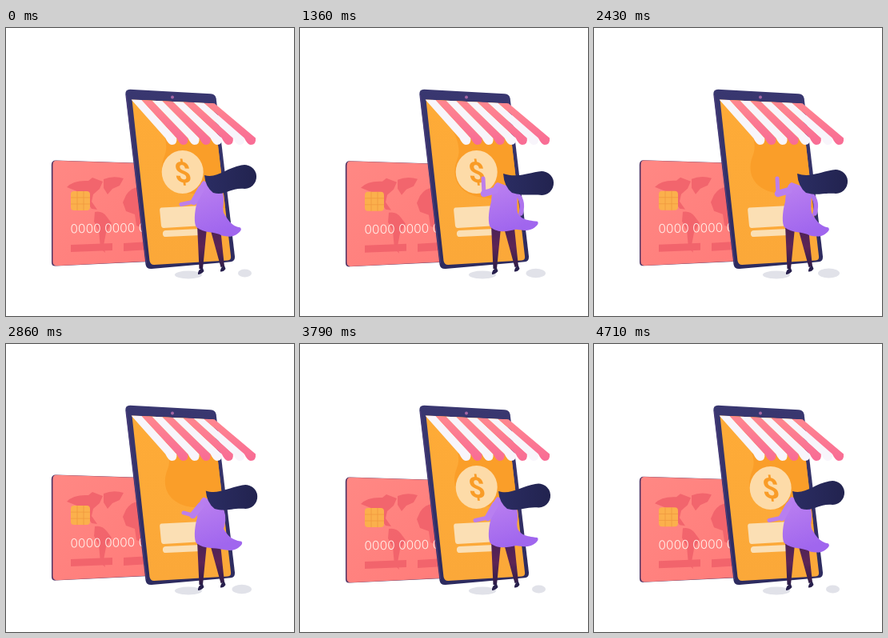
These frames come from a looping animation (360 px wide and 360 px high, 4780 ms). An HTML page:

```html
<!DOCTYPE html>
<html lang="en">
<head>
<meta charset="utf-8">
<title>Mobile shop</title>
<style>
html, body { margin: 0; width: 100%; height: 100%; overflow: hidden; background: #fff; }
svg { display: block; width: 100vw; height: 100vh; }
</style>
</head>
<body>
<svg viewBox="0 0 360 360">
  <defs>
    <linearGradient id="cardFill" x1="0" y1="0" x2="1" y2="1">
      <stop offset="0" stop-color="#ff8884"/><stop offset="1" stop-color="#ff7b79"/>
    </linearGradient>
    <linearGradient id="frameFill" x1="0" y1="0" x2="0" y2="1">
      <stop offset="0" stop-color="#393770"/><stop offset="1" stop-color="#2d2b5f"/>
    </linearGradient>
    <linearGradient id="screenFill" x1="0" y1="0" x2="0" y2="1">
      <stop offset="0" stop-color="#feab37"/><stop offset="1" stop-color="#fba839"/>
    </linearGradient>
    <linearGradient id="coatFill" x1="0" y1="0" x2=".3" y2="1">
      <stop offset="0" stop-color="#bd82f0"/><stop offset="1" stop-color="#a066ee"/>
    </linearGradient>
    <linearGradient id="legFill" x1="0" y1="0" x2="0" y2="1">
      <stop offset="0" stop-color="#4a2157"/><stop offset=".5" stop-color="#5d2555"/><stop offset="1" stop-color="#2c1d48"/>
    </linearGradient>
    <linearGradient id="hairFill" x1="0" y1="0" x2="1" y2="0">
      <stop offset="0" stop-color="#2b2d63"/><stop offset="1" stop-color="#22234f"/>
    </linearGradient>
    <linearGradient id="pink" x1="0" y1="0" x2="0" y2="1">
      <stop offset="0" stop-color="#ff868f"/><stop offset="1" stop-color="#f86c95"/>
    </linearGradient>
    <clipPath id="screenClip"><path id="screenShape" d="M157.500 89.500 L259 94.500 L281 285 Q282 290 277 290.500 L185 296 Q180.500 296 179.500 291 Z"/></clipPath>
  </defs>

  <ellipse cx="228" cy="308.500" rx="17" ry="5" fill="#e1e2e9"/>
  <ellipse id="shade" cy="306.500" fill="#e1e2e9"/>

  <g id="card">
    <path d="M56.800 171 Q57 165.500 62 165.500 L190 169.500 V291.500 L62 297.500 Q57 298 57 293 Z" fill="#4f3566"/>
    <path d="M58.500 171 Q58.500 165.700 63 165.700 L190 169.700 V291 L63 297.200 Q58.500 297 58.500 292 Z" fill="url(#cardFill)"/>
    <g fill="#f0606a" opacity=".85">
      <path d="M76 199 Q84 190 103 191 L108 187 L121 192 L117 201 L109 208 L107 217 L114 227 L107 226 L100 216 L97 207 L86 203 Z"/>
      <path d="M122 189 Q134 184 147 188 L142 197 L133 201 L127 208 L122 200 Z"/>
      <path d="M111 230 Q120 228 126 236 L132 244 L125 256 L122 272 L124 281 L118 275 L116 253 L110 242 Z"/>
      <path d="M150 209 Q157 198 168 199 L180 205 V254 L163 247 L161 233 L150 229 L146 218 Z"/>
      <path d="M81 271 L133 269 V278 L81 280 Z M147 269 L180 267 V277 L147 279 Z"/>
    </g>
    <rect x="81" y="204" width="24" height="24" rx="4" fill="#fbb04c"/>
    <path d="M81 212 H89 V220 H81 M105 212 H97 V220 H105 M89 204 V212 H97 V204 M89 228 V220 H97 V228" fill="none" stroke="#f0993f" stroke-width=".8"/>
    <text x="80.500" y="256.500" font-family="Inter, sans-serif" font-weight="300" font-size="15.500" fill="#fff0ea" transform="rotate(-1 81 257)">0000 0000 0</text>
  </g>

  <path d="M149.300 83 Q149 76.800 155 76.800 L256 82.200 Q261.800 82.700 262.700 88.300 L286 285.500 Q286.500 291.500 281 292.300 L182 301 Q175.500 301.500 174.500 295.500 Z" fill="url(#frameFill)"/>
  <path d="M150.500 84 L175.500 294" stroke="#4b3d7c" stroke-width="1.200"/>
  <use href="#screenShape" fill="url(#screenFill)"/>
  <circle cx="208" cy="86.500" r="2" fill="#a566a4"/>

  <g clip-path="url(#screenClip)">
    <path id="wave" d="M160 75 C188 112 207 138 198 160 C188 185 204 206 233 207 C258 209 266 229 295 232 V70 H160 Z" fill="#fb9c26" opacity=".8"/>
    <path d="M194.500 224.500 L255 221.500 V246.500 L197 250 Q194.500 250 194 247 L192.200 228 Q192 224.700 194.500 224.500 Z" fill="#fbdfb4"/>
    <path d="M200 257 L243 255" stroke="#fbdfb4" stroke-width="8.200" stroke-linecap="round"/>
    <g id="coin">
      <ellipse rx="26" ry="27" fill="#fddba8"/>
      <text y="13" text-anchor="middle" font-family="Roboto, sans-serif" font-weight="700" font-size="36" fill="#f99c27" transform="skewX(8) skewY(3)">$</text>
    </g>
  </g>

  <g id="awning"></g>

  <path d="M239 246 L251 250 L246 301 L241.500 301 Z M255 250 L268 250 L273 298 L268.500 299 Z" fill="url(#legFill)"/>
  <path d="M240 306 Q241 301 246 300 L247.500 304 Q244 308 240 308 Z M268 303 Q269 298 273 297 L274.500 301 Q272 305 268 304.500 Z" fill="#28204d"/>

  <path id="rightArm" fill="none" stroke="#ae74ed" stroke-width="5.500" stroke-linecap="round"/>
  <path id="coat" fill="url(#coatFill)"/>
  <path id="foreArm" fill="none" stroke="#bd7fe9" stroke-width="5" stroke-linecap="round"/>
  <path id="upperArm" fill="none" stroke="#b87ff0" stroke-width="8.500" stroke-linecap="round"/>
  <path id="hair" fill="url(#hairFill)"/>
</svg>
<script>
const LOOP = 4780;
const el = id => document.getElementById(id);
const set = (id, attrs) => { for (const k in attrs) el(id).setAttribute(k, attrs[k]); };
const mix = (a, b, k) => a + (b - a) * k;

// Eased value from [time, value] pairs
function track(t, keys) {
  let i = 0;
  while (i < keys.length - 2 && t > keys[i + 1][0]) i++;
  const [t0, a] = keys[i], [t1, b] = keys[i + 1];
  const k = Math.min(1, Math.max(0, (t - t0) / (t1 - t0)));
  return mix(a, b, (1 - Math.cos(Math.PI * k)) / 2);
}

function buildAwning() {
  let out = "";
  for (let i = 0; i < 8; i++) {
    const top = n => `${156.6 + 13 * n} ${89.5 + 0.6 * n}`;
    const l = 199.2 + 14.1 * i, r = l + 14.1;
    const fill = i % 2 ? "url(#pink)" : "#f8f5fb";
    out += `<path d="M${top(i)} L${top(i + 1)} L${r} 137.500 Q${r + 1} 146 ${r - 6} 146 Q${l + 4} 146 ${l} 137.500 Z" fill="${fill}"/>`;
  }
  el("awning").innerHTML = out;
}

function drawWoman(t, phase) {
  const p = track(t, [[70, 0], [640, 1], [2480, 1], [3080, 0]]);
  const m = (a, b) => mix(a, b, p).toFixed(2);

  const tip = 249.5 + 4 * Math.cos(phase);
  const tx = 295 - 2 * Math.cos(phase);
  set("coat", { d: `M247 ${m(191, 193)} C241 195 240 206 239 217 C235 231 235 245 238 249
    C248 257 261 254 270 ${tip + 6} Q${tx - 10} ${tip + 9} ${tx - 4} ${tip + 4}
    Q${tx + 3} ${tip - 1} ${tx} ${tip - 4} C281 ${tip - 6} 277 239 272 231
    C270 221 273 210 ${m(270, 271)} 202 Z` });

  const elbow = `${m(235, 230)} ${m(217, 207)}`;
  set("upperArm", { d: `M244 ${m(201, 203)} L${elbow}` });
  set("foreArm", { d: `M${elbow} L${m(219, 229)} ${m(220.5, 188)}` });
  set("rightArm", { d: `M267 204 Q${m(271, 281)} 213 ${m(268, 276)} ${m(226, 232)}` });

  const sx = mix(248, 254, p), hx = mix(298, 302, p);
  const hy = track(t, [[0, 186], [790, 195], [1930, 193], [2430, 192], [3290, 190], [3790, 189.5], [4780, 186]]);
  const sy = mix(184, 182, p);
  set("hair", { d: `M${sx} ${sy} C${sx + 15} ${sy + 5} ${hx - 23} ${hy - 11} ${hx - 4} ${hy - 14.5}
    A15 15 0 1 1 ${hx - 2} ${hy + 14.8}
    C${hx - 18} ${hy + 14} ${sx + 26} 210 ${sx + 11} 206 Q${sx + 1} 198 ${sx} ${sy} Z` });
}

function drawCoin(t) {
  const leaving = t < 2600;
  const y = leaving
    ? track(t, [[1500, 180], [2360, 119]])
    : track(t, [[2950, 209], [3700, 179], [4780, 180]]);
  const alpha = leaving
    ? track(t, [[1750, 1], [2350, 0]])
    : track(t, [[2990, 0], [3680, 1]]);
  set("coin", { transform: `translate(220.7 ${y})`, opacity: alpha });
}

function draw(t) {
  const phase = 4 * Math.PI * t / LOOP;
  set("card", { transform: `translate(0 ${-2 * Math.sin(phase)})` });
  set("wave", { transform: `translate(${4 * Math.sin(phase)} ${5 * Math.sin(phase / 2)})` });
  const left = track(t, [[0, 290], [790, 285], [1930, 280], [2430, 280], [3290, 285], [3790, 290]]);
  set("shade", { cx: (left + 307) / 2, rx: (307 - left) / 2, ry: mix(6, 5, (left - 280) / 10) });
  drawCoin(t);
  drawWoman(t, phase);
}

buildAwning();
const start = performance.now();
function tick() {
  draw((performance.now() - start) % LOOP);
  requestAnimationFrame(tick);
}
tick();
</script>
</body>
</html>
```
